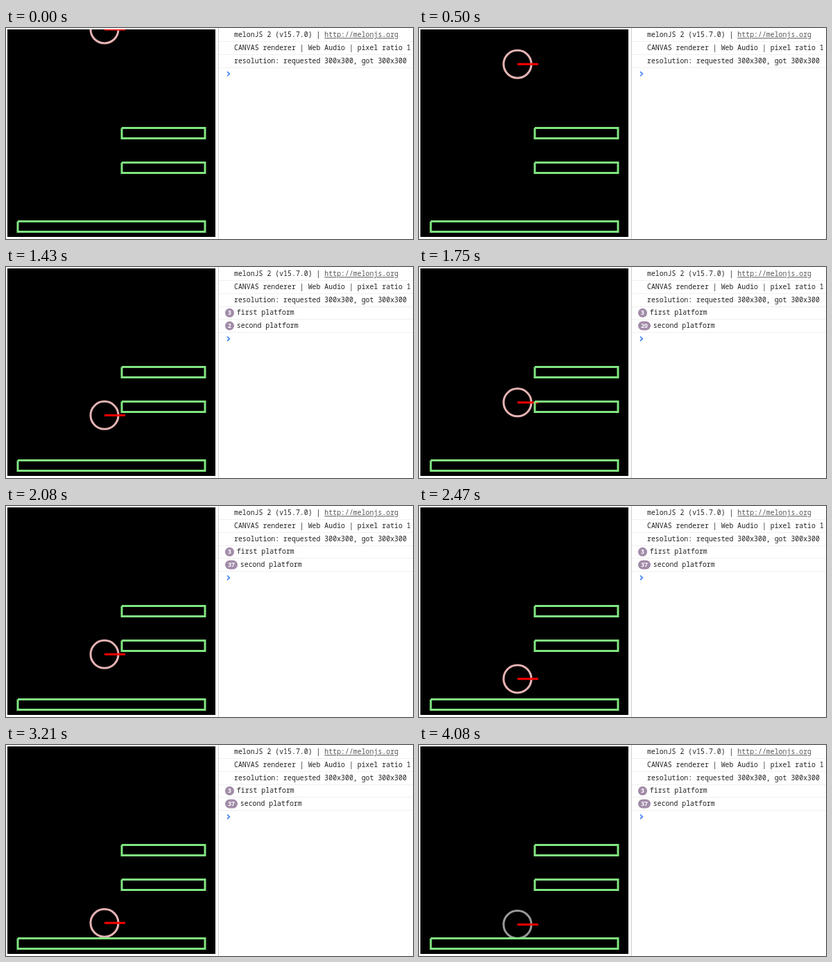
Recreate the animation shown at these times as an HTML page. Size 587x305 px, loop 4.77 s.

```html
<!DOCTYPE html>
<html lang="en">
<head>
<meta charset="utf-8">
<title>Bouncing ball with console</title>
<style>
  html, body { margin: 0; width: 100%; height: 100%; overflow: hidden; background: #fff; }
  svg { display: block; width: 587px; height: 305px; }
  text { font: 9.88px "Noto Sans Mono", "DejaVu Sans Mono", monospace; fill: #222; white-space: pre; }
  .link { fill: #555; text-decoration: underline; }
  .count { font: bold 8.5px "Open Sans", "Noto Sans", sans-serif; fill: #fff; text-anchor: middle; }
  .badge { fill: #a18ba8; }
  .rule { fill: #f0f0f0; }
  .platform { fill: none; stroke: #80e680; stroke-width: 3; }
</style>
</head>
<body>
<svg viewBox="0 0 587 305">
  <defs><clipPath id="world"><rect x="2" y="2" width="300" height="300"/></clipPath></defs>
  <rect x="2" y="2" width="300" height="300"/>
  <g clip-path="url(#world)">
    <g id="ball">
      <circle id="ring" r="20" fill="none" stroke-width="3"/>
      <path d="M0 0h30" stroke="#f00" stroke-width="3"/>
    </g>
    <path class="platform" d="M167 144.5h120v15h-120v-15"/>
    <path class="platform" d="M167 194.5h120v15h-120v-15"/>
    <path class="platform" d="M17 279.5h270v15h-270v-15"/>
  </g>
  <rect x="306" width="1" height="305" fill="#cacdd1"/>
  <g id="console">
    <text x="329" y="13.3">melonJS 2 (v15.7.0) | <tspan class="link">http://melonjs.org</tspan></text>
    <text x="329" y="32">CANVAS renderer | Web Audio | pixel ratio 1</text>
    <text x="329" y="50.6">resolution: requested 300x300, got 300x300</text>
  </g>
  <path id="prompt" d="M319 -3.2l3.4 3.2l-3.4 3.2" fill="none" stroke="#367cf1" stroke-width="1.5"/>
</svg>
<script>
const LOOP = 4770, TICK = 30;
const TICK_STARTS = [0, 290, 1480, 3000, LOOP]; // the tick before each start is held longer
const GRAVITY = 350, FLOOR = 259.5, ROW = 18.67;
const FIRST_BOUNCE = 1.152, FIRST_FLIGHT = 1.206, REST = 3.56, SLEEP = 4080;

const $ = id => document.getElementById(id);
const clamp = (v, lo, hi) => Math.min(hi, Math.max(lo, v));

function add(parent, tag, attrs, text = '') {
  const node = document.createElementNS('http://www.w3.org/2000/svg', tag);
  for (const key in attrs) node.setAttribute(key, attrs[key]);
  node.textContent = text;
  return parent.appendChild(node);
}

function addRule(parent, row) {
  add(parent, 'rect', { class: 'rule', x: 307, y: Math.floor(19.7 + row * ROW), width: 280, height: 1 });
}

function addMessage(row, label) {
  const group = add($('console'), 'g', {});
  const mid = 10 + row * ROW;
  const badge = add(group, 'rect', { class: 'badge', x: 316, y: mid - 6.2, height: 13, rx: 6.5 });
  const digits = add(group, 'text', { class: 'count', y: mid + 3.4 });
  const text = add(group, 'text', { y: mid + 3.3 }, label);
  addRule(group, row);
  return count => {
    const width = count > 9 ? 18 : 13;
    group.style.display = count ? '' : 'none';
    badge.style.display = digits.style.display = count > 1 ? '' : 'none';
    badge.setAttribute('width', width);
    digits.setAttribute('x', 316 + width / 2);
    digits.textContent = count;
    text.setAttribute('x', count > 1 ? 319.8 + width : 329);
  };
}

function snap(ms) {
  const i = TICK_STARTS.findLastIndex(s => s <= ms);
  const start = TICK_STARTS[i];
  const last = Math.floor((TICK_STARTS[i + 1] - start) / TICK) - 1;
  return start + TICK * Math.min(last, Math.floor((ms - start) / TICK));
}

// Free fall, then bounces that each last half as long as the one before
function ballY(t) {
  if (t < FIRST_BOUNCE) return 2 + 13 * t + GRAVITY / 2 * t * t;
  if (t >= REST) return FLOOR;
  let dt = t - FIRST_BOUNCE, flight = FIRST_FLIGHT;
  while (dt > flight) {
    dt -= flight;
    flight /= 2;
  }
  return FLOOR - GRAVITY / 2 * dt * (flight - dt);
}

// Log calls made at 60 per second while the red feeler touches a platform
const hits = (t, start, max) => clamp(Math.floor((t - start) * 60) + 1, 0, max);

for (let row = 0; row < 3; row++) addRule($('console'), row);
const showFirst = addMessage(3, 'first platform');
const showSecond = addMessage(4, 'second platform');

function draw(now) {
  const ms = snap(now % LOOP), t = ms / 1000;
  const first = hits(t, 0.865, 3);
  const second = hits(t, 1.01, 2) + hits(t, 1.46, 35);
  $('ball').setAttribute('transform', `translate(142 ${ballY(t).toFixed(2)})`);
  $('ring').setAttribute('stroke', ms < SLEEP ? '#e6b3b3' : '#999');
  showFirst(first);
  showSecond(second);
  const rows = 3 + (first > 0) + (second > 0);
  $('prompt').setAttribute('transform', `translate(0 ${10.3 + rows * ROW})`);
}

const begin = performance.now();
function frame() {
  draw(performance.now() - begin);
  requestAnimationFrame(frame);
}
frame();
</script>
</body>
</html>
```
